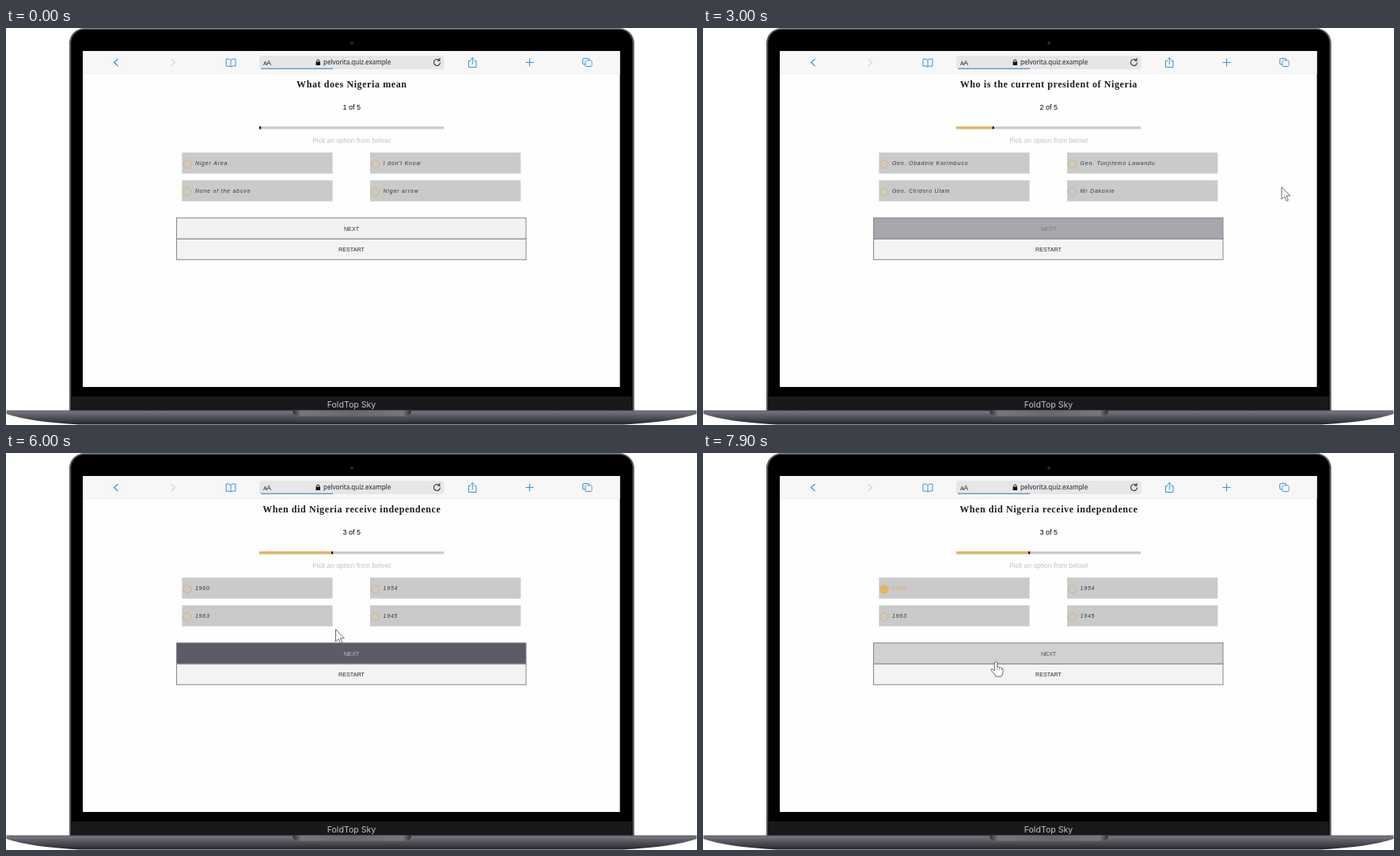
An HTML page with a canvas that plays this animation: 873 by 501 pixels, repeating every 8 s.

```html
<!DOCTYPE html>
<html lang="en">
<head>
<meta charset="utf-8">
<title>Quiz on a laptop</title>
<style>
html, body { margin: 0; width: 100%; height: 100%; overflow: hidden; background: #fff; }
canvas { display: block; width: 873px; height: 501px; }
</style>
</head>
<body>
<canvas id="stage"></canvas>
<script>
const W = 873, H = 501, LOOP = 8000, TICK = 100;
const canvas = document.getElementById('stage');
const ctx = canvas.getContext('2d');
const dpr = window.devicePixelRatio || 1;
canvas.width = W * dpr;
canvas.height = H * dpr;

const SANS = '"Liberation Sans", Arial, sans-serif';
const SERIF = '"Liberation Serif", "Times New Roman", serif';
const ORANGE = '#e5b464', BLUE = '#3d92d2';

const questions = [
  { from: 0, title: 'What does Nigeria mean', pick: 0, pickAt: 1200,
    options: ['Niger Area', "I don't Know", 'None of the above', 'Niger arrow'] },
  { from: 2500, title: 'Who is the current president of Nigeria', pick: 1, pickAt: 3900, tick: true,
    options: ['Gen. Obadele Karimbuso', 'Gen. Tunjifemo Lawandu', 'Gen. Chidoro Ulam', 'Mr Dakonle'] },
  { from: 5400, title: 'When did Nigeria receive independence', pick: 0, pickAt: 7400,
    options: ['1960', '1954', '1963', '1945'] }
];

// Pointer path: time, x, y of the tip
const path = [
  [200, 455, 62], [400, 388, 103], [500, 388, 103], [700, 248, 168],
  [1300, 248, 168], [1600, 335, 240], [2000, 387, 256], [2600, 387, 256],
  [2820, 560, 238], [3000, 731, 200.5], [3200, 530, 168], [4100, 530, 168],
  [4550, 500, 240], [4800, 490, 252], [5700, 490, 252], [5900, 442, 239],
  [6000, 416.5, 222.5], [6400, 328, 200], [6800, 250, 168], [7500, 250, 168],
  [7830, 349, 241], [7900, 370, 263]
];
const hovers = [[1600, 2820], [4550, 5910], [7830, 9000]];

const arrow = new Path2D('M0 0V15.5L3.7 12.2L6.2 17.8L8.4 16.8L6 11.3H10.8Z');
const hand = new Path2D('M-1.7 1.5Q0 -1 1.7 1.5V7Q3.3 6 4.5 7.6Q6 6.8 7 8.6' +
  'Q9 8 9 10.3V13Q9 16 7 19H0Q-2 15 -6 11.2Q-6 8.3 -3.6 10L-1.7 12Z');

function text(str, x, y, font, color, align = 'left', spacing = 0) {
  ctx.font = font;
  ctx.fillStyle = color;
  ctx.textAlign = align;
  ctx.letterSpacing = spacing + 'px';
  ctx.fillText(str, x, y);
}

function rect(x, y, w, h, color) {
  ctx.fillStyle = color;
  ctx.fillRect(x, y, w, h);
}

function round(x, y, w, h, r, color) {
  ctx.beginPath();
  ctx.roundRect(x, y, w, h, r);
  ctx.fillStyle = color;
  ctx.fill();
}

function line(d, color, width = 1) {
  ctx.strokeStyle = color;
  ctx.lineWidth = width;
  ctx.stroke(new Path2D(d));
}

function disc(x, y, r, color) {
  ctx.beginPath();
  ctx.arc(x, y, r, 0, Math.PI * 2);
  ctx.fillStyle = color;
  ctx.fill();
}

function gradient(x0, y0, x1, y1, ...stops) {
  const g = ctx.createLinearGradient(x0, y0, x1, y1);
  stops.forEach(([at, color]) => g.addColorStop(at, color));
  return g;
}

function mix(a, b, k) {
  return `rgb(${a.map((v, i) => Math.round(v + (b[i] - v) * k)).join()})`;
}

// CSS "ease" curve
function ease(x) {
  if (x <= 0) return 0;
  if (x >= 1) return 1;
  let lo = 0, hi = 1, u;
  for (let i = 0; i < 24; i++) {
    u = (lo + hi) / 2;
    if (0.75 * u * (1 - u) + u ** 3 < x) lo = u; else hi = u;
  }
  return 0.3 * u * (1 - u) ** 2 + 3 * u * u * (1 - u) + u ** 3;
}

function hoverLevel(t) {
  let level = 0;
  for (const [a, b] of hovers) {
    if (t >= a) level = ease((t - a) / 500) * (1 - ease((t - b) / 500));
  }
  return level;
}

function pointerAt(t) {
  const i = path.findIndex(p => p[0] > t);
  if (i === 0) return null;
  if (i < 0) return path[path.length - 1].slice(1);
  const [t0, x0, y0] = path[i - 1], [t1, x1, y1] = path[i];
  const k = (t - t0) / (t1 - t0);
  return [x0 + (x1 - x0) * k, y0 + (y1 - y0) * k];
}

function laptop() {
  rect(0, 0, W, H, '#fff');
  round(80, 0.3, 713.7, 486, [19, 19, 0, 0], '#56575c');
  round(82.2, 2, 709.3, 484, [17, 17, 0, 0], '#000');
  rect(83, 465, 707.5, 18, '#19191b');
  disc(437, 19, 2.2, '#1d1e24');
  disc(437, 19, 0.8, '#3a3d4a');
  text('FoldTop Sky', 436.5, 478.5, '10.6px Inter, sans-serif', '#c3c3c5', 'center');

  ctx.fillStyle = gradient(0, 482.5, 0, 500.5,
    [0, '#5c5c64'], [0.12, '#74747d'], [0.35, '#5d5d66'], [0.65, '#44444c'], [1, '#222227']);
  ctx.fill(new Path2D('M0.5 482.5H872.5V487Q843 497 780 500.5H93Q30 497 0.5 487Z'));
  ctx.fillStyle = gradient(362, 0, 512, 0,
    [0, '#2c2c30'], [0.07, '#77777c'], [0.5, '#68686d'], [0.93, '#77777c'], [1, '#2c2c30']);
  ctx.fill(new Path2D('M362 482.5H512Q512 489.5 503 489.5H371Q362 489.5 362 482.5Z'));
}

function browser() {
  rect(97, 29, 678.6, 424, '#fefefe');
  rect(97, 29, 678.6, 28.5, '#f7f7f8');
  rect(97, 57, 678.6, 0.7, '#e9e9ea');
  line('M141.5 39L136.5 43.5L141.5 48', BLUE, 1.2);
  line('M208.5 39L213.5 43.5L208.5 48', '#d3d4d6', 1.1);
  line('M284 40.5Q281 38 278 39.3V48.2Q281 47.2 284 49Q287 47.2 290 48.2V39.3Q287 38 284 40.5V49', BLUE);

  round(320, 35, 233.5, 17, 4, '#e6e6e8');
  rect(322, 50.7, 91, 1.3, '#5293c4');
  text('A', 325, 47, '7px ' + SANS, '#222');
  text('A', 329, 47, '9px ' + SANS, '#222');
  rect(391.5, 42.7, 5.5, 4.3, '#111');
  line('M392.7 43V41.6Q392.7 40 394.25 40Q395.8 40 395.8 41.6V43', '#111');
  text('pelvorita.quiz.example', 401, 46.2, '8px "Noto Sans", sans-serif', '#222');
  line('M547.3 40.6A4 4 0 1 0 548.5 43.6M547.9 38V41.2H544.8', '#333', 1.1);

  line('M587 41.5H584.5V49.5H594V41.5H591.5M589.25 46V37.5M586.7 40L589.25 37.5L591.8 40', BLUE);
  line('M656.5 43.5H666.5M661.5 38.5V48.5', BLUE, 1.1);
  ctx.beginPath();
  ctx.roundRect(728.8, 38.5, 8, 7.5, 1.5);
  ctx.roundRect(732, 41, 8, 7.5, 1.5);
  ctx.stroke();
  rect(732.5, 41.5, 7, 6.5, '#f7f7f8');
}

function option(i, label, picked, tick) {
  const x = i % 2 ? 460 : 222.3, y = i < 2 ? 157.2 : 192.2;
  const cx = x + 6.6, cy = y + 14.6;
  rect(x, y, 190.3, 26.5, '#cacaca');
  if (picked) {
    disc(cx, cy, 5.8, ORANGE);
    if (tick) line(`M${cx - 2.5} ${cy}l2 2l3.3 -4`, '#d8d4cc', 1.1);
  } else {
    ctx.beginPath();
    ctx.arc(cx, cy, 5, 0, Math.PI * 2);
    ctx.strokeStyle = '#deb06a';
    ctx.lineWidth = 1;
    ctx.stroke();
  }
  text(label, x + 16.6, y + 15.6, 'italic 7px ' + SANS, picked ? '#dfaa5a' : '#353944', 'left', 0.78);
}

function button(label, y, fill, color) {
  rect(215.5, y, 441.5, 26.3, fill);
  ctx.strokeStyle = '#858588';
  ctx.lineWidth = 1;
  ctx.strokeRect(215.5, y, 441.5, 26.3);
  text(label, 436.5, y + 15.8, '7.2px ' + SANS, color, 'center');
}

function quiz(t) {
  const n = questions.findLastIndex(q => t >= q.from), q = questions[n];
  text(q.title, 436.8, 75, 'bold 12px ' + SERIF, '#1c1c1f', 'center', 0.6);
  text(`${n + 1} of 5`, 436.7, 103, '9px ' + SANS, '#000', 'center');

  const done = 45.5 * n;
  rect(320, 124.3, 233, 3.2, '#c9c9c9');
  rect(320, 124.3, done, 3.2, ORANGE);
  rect(320 + done, 124.3, 2.2, 3.2, '#111');
  text('Pick an option from below!', 437, 145.2, '8.5px ' + SANS, '#c2c2c2', 'center');

  q.options.forEach((label, i) => option(i, label, i === q.pick && t >= q.pickAt, q.tick));

  const h = hoverLevel(t);
  button('RESTART', 266, '#f3f3f3', '#2a2a2a');
  button('NEXT', 239.7, mix([242, 242, 242], [41, 42, 57], h), mix([51, 51, 51], [240, 240, 240], h));
}

function pointer(t) {
  const p = pointerAt(t);
  if (!p) return;
  const [x, y] = p;
  const onLabel = y > 160 && y < 180 && ((x > 222 && x < 290) || (x > 460 && x < 580));
  const onNext = y >= 240 && y < 266 && x > 215 && x < 657;
  const shape = onLabel || onNext ? hand : arrow;
  ctx.save();
  ctx.translate(x, y);
  ctx.lineJoin = 'round';
  ctx.fillStyle = '#fff';
  ctx.fill(shape);
  ctx.strokeStyle = '#444';
  ctx.lineWidth = 0.8;
  ctx.stroke(shape);
  if (shape === hand) line('M1.7 7V11M4.5 8V11.2M7 9V11.5', '#666', 0.6);
  ctx.restore();
}

function draw(now) {
  const t = Math.floor((now % LOOP) / TICK) * TICK;
  ctx.setTransform(dpr, 0, 0, dpr, 0, 0);
  laptop();
  browser();
  quiz(t);
  pointer(t);
}

let start;
function loop(now) {
  start ??= now;
  draw(now - start);
  requestAnimationFrame(loop);
}
draw(0);
requestAnimationFrame(loop);
</script>
</body>
</html>
```
